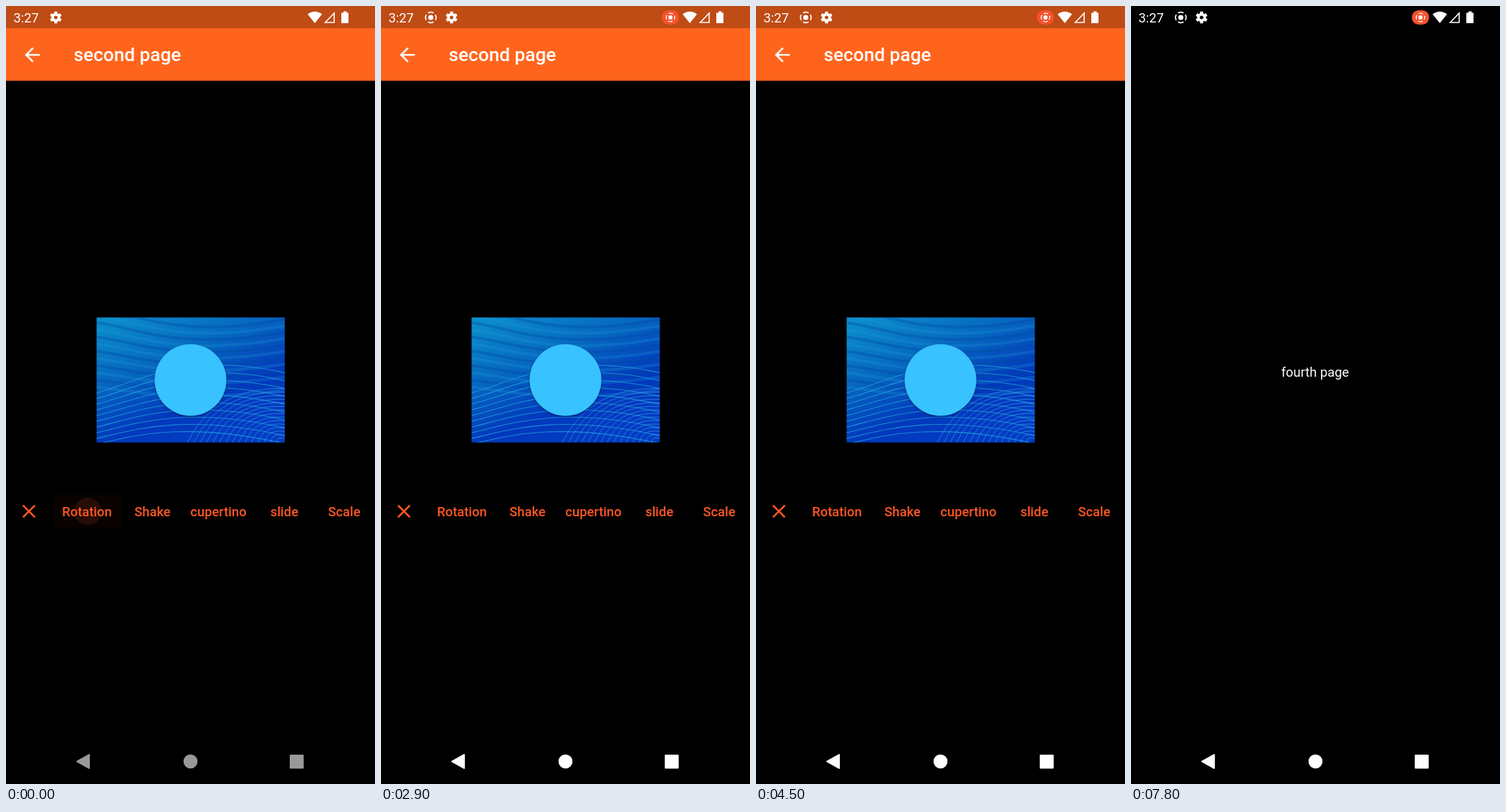
An HTML page that plays this animation: 515 by 1087 pixels, repeating every 8 s.

```html
<!DOCTYPE html>
<html lang="en">
<head>
<meta charset="utf-8">
<title>Page transitions</title>
<style>
html, body { margin: 0; width: 100%; height: 100%; overflow: hidden; background: #000; }
svg { display: block; width: 100vw; height: 100vh; }
text { font: 18.35px Roboto, sans-serif; }
.title { font-size: 26.2px; font-weight: 500; fill: #fff; }
.button { font-weight: 500; fill: #ff5722; text-anchor: middle; }
.label { text-anchor: middle; }
</style>
</head>
<body>
<svg viewBox="0 0 515 1087">
  <defs>
    <linearGradient id="sea" x1="0" y1="0" x2=".6" y2="1">
      <stop offset="0" stop-color="#0c91cd"/>
      <stop offset=".4" stop-color="#0668c0"/>
      <stop offset=".75" stop-color="#0238bc"/>
      <stop offset="1" stop-color="#033cc4"/>
    </linearGradient>
    <filter id="shade" x="-20%" y="-20%" width="140%" height="140%">
      <feDropShadow dx="0" dy="1.5" stdDeviation="1.5" flood-color="#001a50" flood-opacity=".7"/>
    </filter>
    <clipPath id="frame"><path d="M-131-87.300h262.500v174.600h-262.500z"/></clipPath>
    <clipPath id="view"><path d="M0 0h515v1024H0z"/></clipPath>
    <clipPath id="body"><path d="M0 104.500h515V972H0z"/></clipPath>
    <g id="picture" clip-path="url(#frame)" fill="none">
      <path fill="url(#sea)" d="M-132-88h264v176h-264z"/>
      <g id="waves"></g>
      <circle r="50" fill="#38c2ff" filter="url(#shade)"/>
    </g>
    <g id="appBar">
      <path fill="#ff641c" d="M0 0h515v104.500H0z"/>
      <path fill="#fff" transform="translate(21 52.5) scale(1.311)"
        d="M20 11H7.8l5.6-5.6L12 4l-8 8 8 8 1.4-1.4L7.8 13H20z"/>
    </g>
    <g id="record">
      <circle r="7.4" fill="none" stroke="#fff" stroke-width="1.7" pathLength="80" stroke-dasharray="14 6" stroke-dashoffset="7"/>
      <circle r="3.6" fill="#fff"/>
    </g>
  </defs>

  <g clip-path="url(#view)">
    <g id="second">
      <use href="#appBar"/>
      <text class="title" x="94.5" y="77.2">second page</text>
      <use href="#picture" x="257.5" y="522.5"/>
      <g id="presses" fill="#ff5722"></g>
      <path fill="#ff5722" transform="translate(16.3 690.3) scale(1.311)"
        d="M19 6.4L17.6 5 12 10.6 6.4 5 5 6.4l5.6 5.6L5 17.6 6.4 19l5.6-5.6 5.6 5.6 1.4-1.4-5.6-5.6z"/>
      <g id="buttons"></g>
    </g>
    <g id="image">
      <path d="M0 0h515v1024H0z"/>
      <g clip-path="url(#body)">
        <use href="#picture" transform="translate(257.5 538.5) scale(4.97)"/>
      </g>
      <use href="#appBar"/>
      <text class="title" x="94.5" y="77.2">Image</text>
    </g>
    <g id="third">
      <path fill="#f9f7fa" d="M0 0h515v1024H0z"/>
      <text class="label" x="257" y="518.3" fill="#1c1b1d">third page</text>
    </g>
    <g id="fourth">
      <path id="veil" d="M0 0h515v1024H0z"/>
      <text class="label" x="257" y="518.3" fill="#fff">fourth page</text>
    </g>
  </g>

  <path fill="#000" fill-opacity=".25" d="M0 0h515v31H0z"/>
  <g fill="#fff">
    <text x="10.5" y="22.5">3:27</text>
    <g id="gear">
      <circle r="4.4" fill="none" stroke="#fff" stroke-width="3.6"/>
      <path id="teeth" stroke="#fff" stroke-width="4.2"/>
    </g>
    <g id="recording">
      <use href="#record" x="69.5" y="16"/>
      <rect x="392" y="6" width="24" height="20" rx="9.5" fill="#f4522d"/>
      <use href="#record" transform="translate(404 16) scale(.8)"/>
    </g>
    <path d="M421 11.5q10-7.5 20 0L431 24z"/>
    <path d="M445.5 23L458 10v13z" fill="none" stroke="#fff" stroke-width="1.6"/>
    <path d="M471 7.5h4.5v2H478V24h-10V9.5h3z"/>
  </g>

  <rect id="pill" y="1024" height="63" fill="#fff"/>
  <g id="nav" stroke-linejoin="round" stroke-width="2">
    <path d="M99 1055.5l17-9.5v19z"/>
    <circle cx="257.5" cy="1055.5" r="8.8"/>
    <rect x="397" y="1047" width="17.5" height="17.5"/>
  </g>
</svg>
<script>
const LOOP = 8000, STEP = 100, TRANSITION = 300;
const $ = id => document.getElementById(id);
const repeat = (n, make) => Array.from({ length: n }, (_, i) => make(i)).join('');
const set = (id, attrs) => Object.entries(attrs).forEach(([k, v]) => $(id).setAttribute(k, v));
const show = (id, on) => set(id, { visibility: on ? 'visible' : 'hidden' });
const clamp = v => Math.max(0, Math.min(1, v));
const ramp = (t, from, length = TRANSITION) => clamp((t - from) / length);

const buttons = [['Rotation', 113], ['Shake', 204.5], ['cupertino', 296.5], ['slide', 388.5], ['Scale', 472]];
$('buttons').innerHTML = buttons.map(([name, x]) => `<text class="button" x="${x}" y="712.5">${name}</text>`).join('');

const wave = (d, color, width) => `<path d="${d}" stroke="${color}" stroke-width="${width}"/>`;
$('waves').innerHTML =
  // soft ridges sinking to the right
  repeat(12, i => wave(`M-132 ${-100 + i * 10}C-80 ${-95 + i * 10} -20 ${-55 + i * 8} 132 ${-85 + i * 9}`,
    i % 2 ? '#1d9ad044' : '#0045a055', 4)) +
  // flat bright strands
  repeat(10, i => wave(`M-132 ${18 + i * 8}C-80 ${6 + i * 8} -10 ${-42 + i * 11} 132 ${-10 + i * 11}`,
    '#1fa5ddc0', 1.1)) +
  // hill of fine lines on the right
  repeat(15, i => wave(`M${-5 + i * 9} 88Q${35 + i * 6} ${8 + i * 5} 132 ${12 + i * 5}`,
    '#45b0ebc0', .7));

$('teeth').setAttribute('d', repeat(6, i => {
  const a = (i + .5) * Math.PI / 3, x = Math.cos(a), y = Math.sin(a);
  return `M${x * 4} ${y * 4}L${x * 8.2} ${y * 8.2}`;
}));

// Button presses: start time, left edge, width, touch point
const presses = [[-100, 66, 96, 114], [4900, 163, 84, 205], [7300, 163, 84, 205]];
$('presses').innerHTML = presses.map(([, x, w], i) => `
  <clipPath id="edge${i}"><rect x="${x}" y="683" width="${w}" height="46" rx="5"/></clipPath>
  <g id="press${i}" clip-path="url(#edge${i})">
    <rect id="glow${i}" x="${x}" y="683" width="${w}" height="46"/>
    <circle id="ripple${i}" cy="706"/>
  </g>`).join('');

function drawPress([start, , , cx], i, t) {
  const age = t - start;
  show('press' + i, age >= 0 && age < 600);
  set('glow' + i, { opacity: .03 * ramp(age, 0, 100) + .06 * ramp(age, 100, 200) - .09 * ramp(age, 450, 150) });
  set('ripple' + i, { cx, r: 8 + Math.max(0, age) * .11, opacity: .12 * (1 - ramp(age, 100, 250)) });
}

function drawBackPress(t) {
  const age = t - [6300, 3800, 1200].find(s => t >= s);
  show('pill', age >= 0 && age < 700);
  if (!(age >= 0)) return;
  const width = 44 + 88 * ramp(age, 0, 250);
  set('pill', {
    x: 108.5 - width / 2, width, rx: Math.min(31.5, width / 2),
    opacity: (.12 + .05 * ramp(age, 0, 150)) * (1 - ramp(age, 400, 170))
  });
}

// Opening progress of a page that is pushed and then popped
const opened = (t, push, pop) => ramp(t, push) - ramp(t, pop);
const elasticRest = u => 2 ** (-10 * u) * Math.cos(u * 5 * Math.PI);

function draw(t) {
  const third = opened(t, 130, 1460);
  const image = opened(t, 3100, 4160);
  const fourth = opened(t, 5219, 6750) + ramp(t, 7440);

  show('third', third > 0);
  set('third', { transform: `rotate(${third * 360} 257.5 512)` });
  show('image', image > 0);
  set('image', { opacity: image });
  show('fourth', fourth > 0);
  set('fourth', { transform: `translate(${fourth < 1 ? 140 * elasticRest(fourth) : 0})` });
  set('veil', { opacity: fourth < 1 ? .1 : 1 });

  presses.forEach((press, i) => drawPress(press, i, t));
  drawBackPress(t);

  const recording = t >= 200;
  show('recording', recording);
  set('gear', { transform: `translate(${recording ? 98.5 : 69.5} 16)` });
  const shade = 153 + 102 * ramp(t, 1200);
  const color = `rgb(${shade},${shade},${shade})`;
  set('nav', { fill: color, stroke: color });
}

function tick() {
  const t = performance.now() % LOOP;
  draw(Math.floor(t / STEP) * STEP);
  requestAnimationFrame(tick);
}
tick();
</script>
</body>
</html>
```
